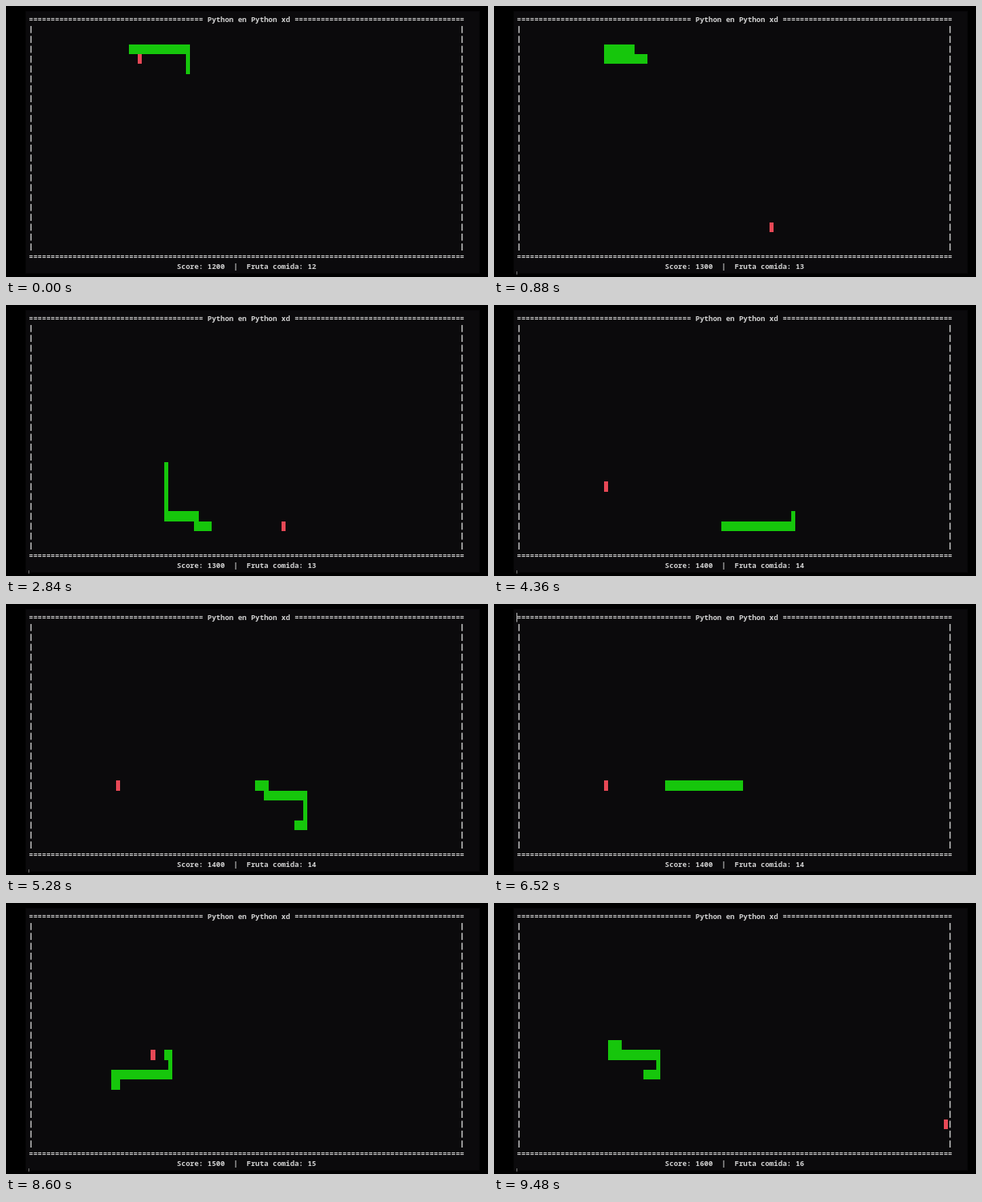
These frames come from a looping animation (600x338 px, 9520 ms). An HTML page with a canvas:

```html
<!DOCTYPE html>
<html lang="es">
<head>
<meta charset="utf-8">
<title>Python en Python xd</title>
<style>
  html, body { margin: 0; width: 100%; height: 100%; overflow: hidden; background: #000; }
  canvas { display: block; width: 600px; height: 338px; }
</style>
</head>
<body>
<canvas id="stage" width="600" height="338"></canvas>
<script>
const ctx = document.getElementById('stage').getContext('2d');

const LOOP = 9520, TICK = 40;
const STEPS_PER_MS = 15 / 1000, LEAD = 7;
const LEFT = 28.5, TOP = 10.6, CELL_W = 5.42, CELL_H = 12.33;
const COLS = 100, BOTTOM_ROW = 24;
const START_LENGTH = 16, START_FRUIT = 12;
const TITLE = '='.repeat(40) + ' Python en Python xd ' + '='.repeat(39);

// Corners of the snake's route as [column, row], from its first tail cell.
const corners = [
  [36, 5], [36, 3], [20, 3], [20, 4], [31, 4], [31, 20], [38, 20],
  [38, 21], [63, 21], [63, 18], [54, 18], [54, 17], [19, 17], [19, 16],
  [32, 16], [32, 14], [21, 14], [21, 13], [23, 13]
];
const fruits = [[25, 4], [58, 21], [20, 17], [28, 14], [98, 21]];

function expandRoute(points) {
  const cells = [points[0]];
  for (const [col, row] of points.slice(1)) {
    let [x, y] = cells[cells.length - 1];
    while (x !== col || y !== row) {
      x += Math.sign(col - x);
      y += Math.sign(row - y);
      cells.push([x, y]);
    }
  }
  return cells;
}

const route = expandRoute(corners);
const mealSteps = fruits.slice(0, -1).map(([col, row]) =>
  route.findIndex(([x, y]) => x === col && y === row) - START_LENGTH + 1);

const colX = col => LEFT + col * CELL_W;
const rowY = row => TOP + row * CELL_H;

function fillCell([col, row], color) {
  const x = Math.round(colX(col)), y = Math.round(rowY(row));
  ctx.fillStyle = color;
  ctx.fillRect(x, y, Math.round(colX(col + 1)) - x, Math.round(rowY(row + 1)) - y);
}

function print(text, col, row) {
  ctx.fillStyle = '#d2d2d2';
  [...text].forEach((ch, i) => {
    if (ch !== ' ') ctx.fillText(ch, colX(col + i + 0.5), rowY(row) + 9.3);
  });
}

function drawTerminal() {
  ctx.fillStyle = '#000';
  ctx.fillRect(0, 0, 600, 338);
  ctx.fillStyle = '#060506';
  ctx.fillRect(24, 6, 566, 328);
  ctx.fillStyle = '#0b0a0c';
  ctx.fillRect(25, 7, 564, 326);

  ctx.font = 'bold 9px "Noto Sans Mono", "DejaVu Sans Mono", monospace';
  ctx.textAlign = 'center';
  print(TITLE, 0, 0);
  print('='.repeat(COLS), 0, BOTTOM_ROW);

  ctx.fillStyle = '#cccccc';
  for (let row = 1; row < BOTTOM_ROW; row++) {
    for (const col of [0, COLS - 1]) {
      ctx.fillRect(colX(col + 0.5) - 0.8, rowY(row) + 2, 1.4, 8.8);
    }
  }
}

function drawCursor(step, phase) {
  if (phase > 0.75) {
    ctx.fillStyle = '#bbbbbb';
    ctx.fillRect(28, 11, 1, 11.5);
  } else if ((step + 1) % 9 > 1) {
    ctx.fillStyle = '#777777';
    ctx.fillRect(28, 331, 1, 4);
  }
}

function draw(time) {
  const progress = (time + LEAD) * STEPS_PER_MS;
  const step = Math.floor(progress);
  const eaten = mealSteps.filter(meal => meal <= step).length;
  const total = START_FRUIT + eaten;

  drawTerminal();
  print(`Score: ${total * 100}  |  Fruta comida: ${total}`, 34, BOTTOM_ROW + 1);
  fillCell(fruits[eaten], '#e74856');
  const head = step + START_LENGTH;
  route.slice(step - eaten, head).forEach(cell => fillCell(cell, '#16c60c'));
  drawCursor(step, progress - step);
}

const start = performance.now();
function frame() {
  const time = (performance.now() - start) % LOOP;
  draw(Math.floor(time / TICK) * TICK);
  requestAnimationFrame(frame);
}
frame();
</script>
</body>
</html>
```
